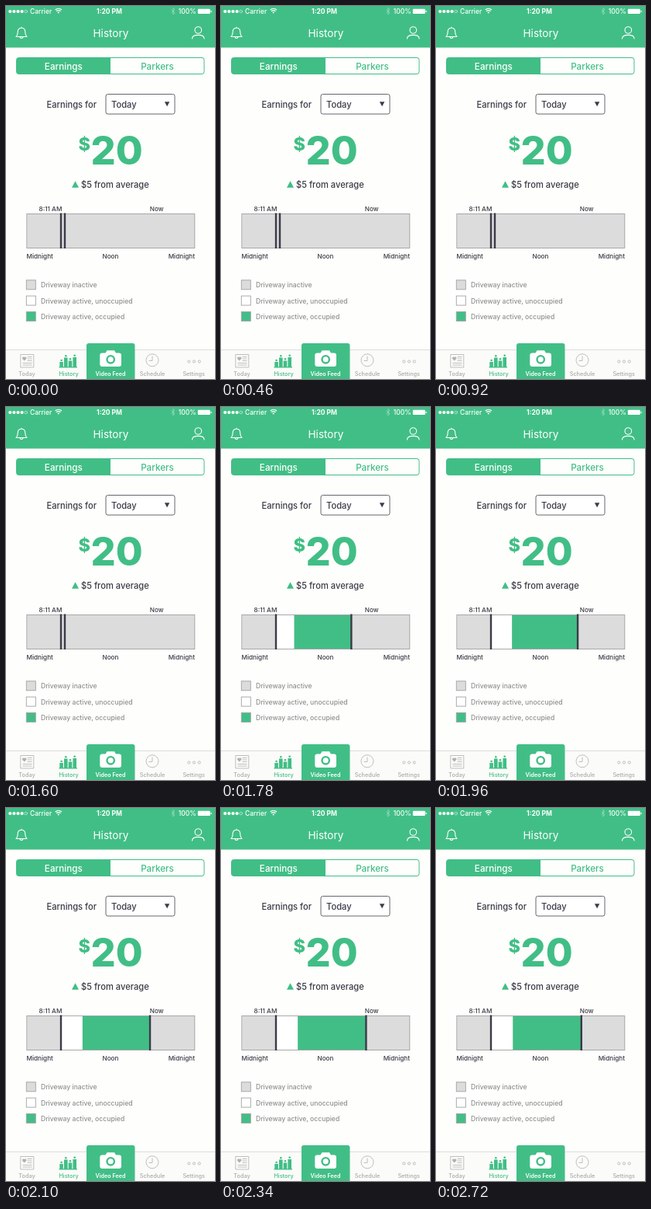
Write an HTML page that moves like this. It is 270 px wide and 480 px high and loops after 3260 ms.

```html
<!DOCTYPE html>
<html lang="en">
<head>
<meta charset="utf-8">
<title>Earnings history</title>
<style>
  html, body { margin: 0; width: 100%; height: 100%; overflow: hidden; background: #fefefc; }
  svg { display: block; width: 100%; height: 100%; font-family: Inter, Roboto, sans-serif; font-weight: 500; }
  .green { fill: #41be86; }
  .dark { fill: #3a3b47; }
  .white { fill: #fff; }
  .grey { fill: #8f8f91; }
  .inactive { fill: #dcdcdc; }
  .mid { text-anchor: middle; }
  .end { text-anchor: end; }
  .status { font-size: 8.5px; }
  .tab { font-size: 11.7px; }
  .body { font-size: 11.15px; }
  .axis { font-size: 8.2px; }
  .legend { font-size: 8.6px; }
  .sum { font-weight: 800; }
  .nav { font-size: 7.3px; fill: #ababab; }
  .nav.on { fill: #41be86; }
  .line { fill: none; stroke: #fff; stroke-width: 1.1; stroke-linecap: round; stroke-linejoin: round; }
  .icon { fill: none; stroke: #b0b0b0; stroke-width: .8; }
  .frame { stroke: #a2a2a5; stroke-width: .9; }
</style>
</head>
<body>
<svg viewBox="0 0 270 480">
  <rect class="green" width="270" height="53.5"/>

  <g class="white status">
    <circle cx="5.3" cy="7" r="2.1"/><circle cx="10.4" cy="7" r="2.1"/>
    <circle cx="15.5" cy="7" r="2.1"/><circle cx="20.6" cy="7" r="2.1"/>
    <circle class="line" cx="25.7" cy="7" r="1.8" style="stroke-width:.5"/>
    <text x="31" y="10">Carrier</text>
    <text class="mid" x="133.5" y="10.4" font-weight="700">1:20 PM</text>
    <text class="end" x="245.7" y="10">100%</text>
    <path d="M66.4 8.1a2.2 2.2 0 0 1 2.8 0L67.8 9.8Z"/>
    <path class="line" style="stroke-width:1.2;stroke-linecap:butt" d="M65.1 6.8a4.1 4.1 0 0 1 5.4 0M63.7 5a6.2 6.2 0 0 1 8.2 0"/>
    <path class="line" opacity=".5" style="stroke-width:.7" d="M213.8 4.8l4.2 4.1-2.1 2.1V2.5L218 4.6l-4.2 4.1"/>
    <rect x="247.8" y="3.8" width="16" height="6.2" rx="1"/>
    <rect x="264.5" y="5.8" width="1.2" height="2.4" rx=".6"/>
  </g>

  <g class="line">
    <path d="M13 39.5C15 37.8 15.2 35.8 15.2 33.4C15.2 30.2 17 28.2 20 28.2S24.8 30.2 24.8 33.4C24.8 35.8 25 37.8 27 39.5ZM18.2 40.2a1.9 1.9 0 0 0 3.6 0M20 28V27"/>
    <circle cx="248.3" cy="31" r="4.3"/>
    <path d="M240.5 42C240.5 38.6 243.5 37.4 248.3 37.4S256.1 38.6 256.1 42"/>
  </g>
  <text class="white mid" x="135.5" y="39.6" font-size="13.6" font-weight="400">History</text>

  <path class="green" d="M135 66.5H16.5a3 3 0 0 0-3 3V84.5a3 3 0 0 0 3 3H135Z"/>
  <rect x="13.5" y="66.5" width="242.5" height="21" rx="3" fill="none" stroke="#41be86"/>
  <text class="white mid tab" x="74.3" y="81.5">Earnings</text>
  <text class="green mid tab" x="195.5" y="81.5">Parkers</text>

  <text class="dark body" x="52.5" y="130.5">Earnings for</text>
  <rect x="129" y="113.5" width="89" height="25.5" rx="2.5" fill="#fff" stroke="#55565f" stroke-width=".9"/>
  <text class="dark body" x="136" y="130.5">Today</text>
  <path class="dark" d="M204.9 123.2H211.3L208.1 129.2Z"/>

  <text class="green sum" x="93.5" y="186" font-size="23.5">$</text>
  <text class="green sum" x="109.5" y="203.8" font-size="50.5">20</text>
  <path class="green" d="M85 233.7H94L89.5 225.2Z"/>
  <text class="dark body" x="97" y="233.6">$5 from average</text>

  <g class="dark axis">
    <text x="42.5" y="263.6">8:11 AM</text>
    <text x="185.7" y="263.6">Now</text>
    <text x="26.5" y="324.5">Midnight</text>
    <text class="mid" x="135" y="324.5">Noon</text>
    <text class="end" x="244" y="324.5">Midnight</text>
  </g>
  <rect class="inactive" x="27" y="267.5" width="217" height="44"/>
  <rect id="free" class="white" x="71" y="267.5" height="44"/>
  <rect id="taken" class="green" y="267.5" height="44"/>
  <rect class="frame" x="26.8" y="267.5" width="217" height="44" fill="none"/>
  <rect class="dark" x="69.8" y="266.5" width="2.4" height="45.5"/>
  <rect id="now" class="dark" y="266.5" width="2.4" height="45.5"/>

  <g class="legend grey">
    <rect class="inactive frame" x="26.3" y="352.8" width="12" height="12"/>
    <rect class="white frame" x="26.3" y="373.1" width="12" height="12"/>
    <rect class="green frame" x="26.3" y="393.4" width="12" height="12"/>
    <text x="45" y="362.3">Driveway inactive</text>
    <text x="45" y="382.5">Driveway active, unoccupied</text>
    <text x="45" y="402.8">Driveway active, occupied</text>
  </g>

  <rect y="442.5" width="270" height="37.5" fill="#fbfbf9"/>
  <path d="M0 442.5H270" stroke="#d6d6d6" stroke-width=".8"/>
  <path class="green" d="M104 480V437a3 3 0 0 1 3-3H163.500a3 3 0 0 1 3 3V480Z"/>

  <g class="icon">
    <path d="M18.800 448.500H35.800V465H18.800ZM27.500 451.500H33.500M27.500 454H33.500M27.500 456.500H33.500M21.500 459.500H33.500M21.500 462H33.500"/>
    <path fill="#b0b0b0" d="M23.700 456.200l-2.200-2.400a1.200 1.200 0 0 1 2.200-1.300a1.200 1.200 0 0 1 2.200 1.300Z"/>
    <circle cx="189" cy="455.800" r="8"/>
    <path d="M189 450.500V456.500H184.500"/>
    <circle cx="236.300" cy="457.500" r="1.600"/><circle cx="243" cy="457.500" r="1.600"/><circle cx="249.700" cy="457.500" r="1.600"/>
  </g>
  <g class="green">
    <path d="M68.500 464.300H92V465.500H68.500ZM69.300 458H73.900V465H69.300ZM75 452.500H79.600V465H75ZM80.700 456.500H85.300V465H80.700ZM86.400 452H91V465H86.400Z"/>
    <circle cx="71.600" cy="456" r="1.300"/><circle cx="77.300" cy="450.300" r="1.300"/>
    <circle cx="83" cy="454.300" r="1.300"/><circle cx="88.700" cy="449.800" r="1.300"/>
  </g>
  <path class="white" d="M124.300 446.500H128.500L130.500 443.200H140L142 446.500H146a3 3 0 0 1 3 3V461a3 3 0 0 1-3 3H124.300a3 3 0 0 1-3-3V449.500a3 3 0 0 1 3-3Z"/>
  <circle class="green" cx="135.200" cy="454.800" r="5.900"/>
  <circle class="white" cx="135.200" cy="454.800" r="3.500"/>

  <g class="mid">
    <text class="nav" x="27" y="475.700">Today</text>
    <text class="nav on" x="81" y="475.700">History</text>
    <text class="white" x="135" y="475.700" font-size="7.200" font-weight="600">Video Feed</text>
    <text class="nav" x="189" y="475.700">Schedule</text>
    <text class="nav" x="242.700" y="475.700">Settings</text>
  </g>
</svg>
<script>
  const LOOP = 3260, START = 1620, STOP = 2720;
  const OPEN = 71, FROM = 76, TO = 187.8, FREE_WIDTH = 28.3;
  const [free, taken, now] = ["free", "taken", "now"].map(id => document.getElementById(id));

  // Fast start with a long, slow settling tail.
  function progress(time) {
    if (time <= START) return 0;
    if (time >= STOP) return 1;
    return 1 - Math.exp(-2.24 * ((time - START) / 220) ** 0.79);
  }

  function draw(time) {
    const p = progress(time);
    const edge = FROM + (TO - FROM) * p;
    const split = OPEN + FREE_WIDTH * (edge - OPEN) / (TO - OPEN);
    free.setAttribute("width", p ? split - OPEN : 0);
    taken.setAttribute("x", split);
    taken.setAttribute("width", p ? edge - split : 0);
    now.setAttribute("x", edge - 1.2);
  }

  const origin = performance.now();
  function tick() {
    draw((performance.now() - origin) % LOOP);
    requestAnimationFrame(tick);
  }
  tick();
</script>
</body>
</html>
```
